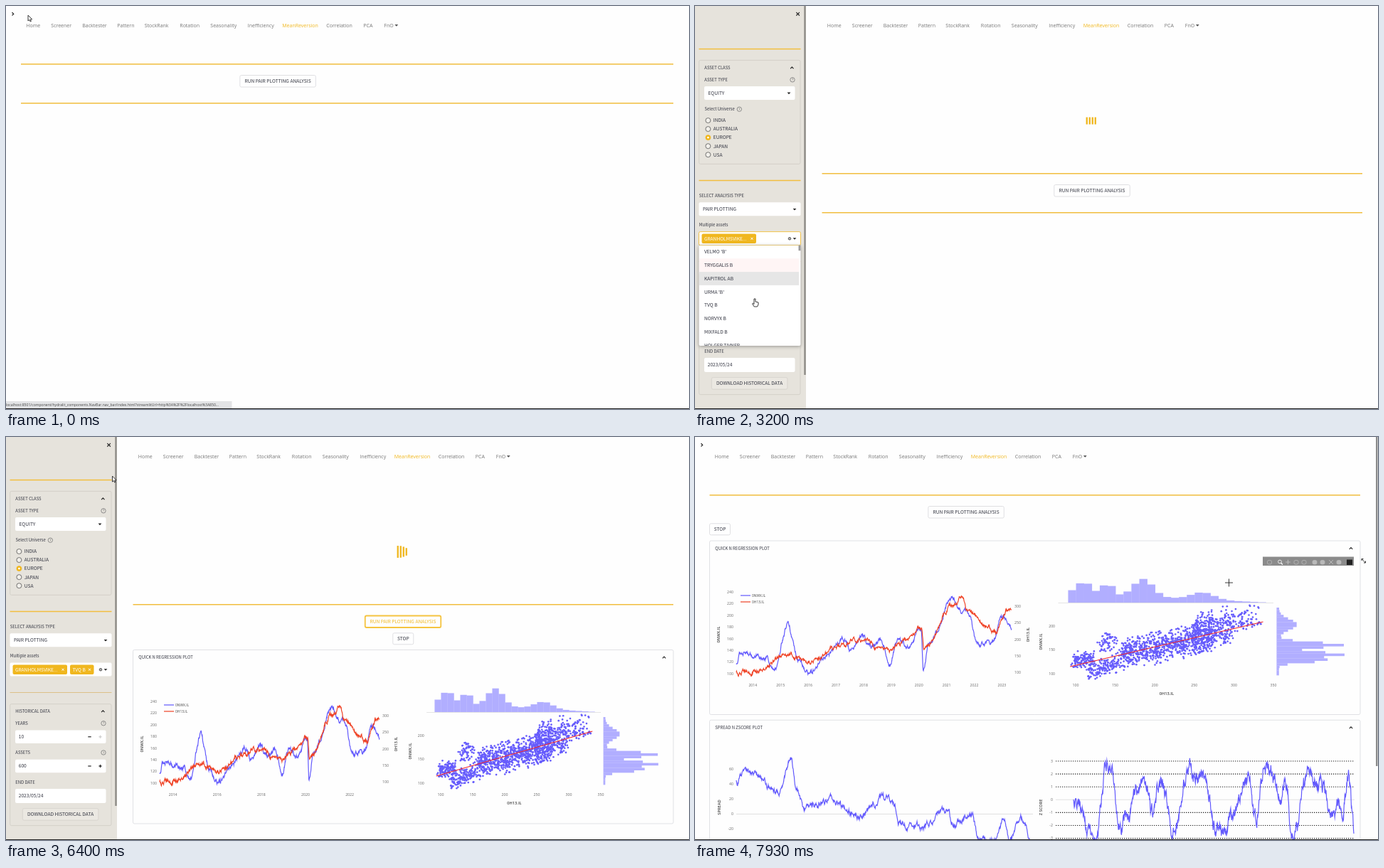
These frames come from a looping animation (960 by 567 pixels, 8 s). An HTML page with a canvas:

```html
<!DOCTYPE html>
<html lang="en">
<head>
<meta charset="utf-8">
<title>Pair plotting dashboard</title>
<style>
html, body { margin: 0; width: 100%; height: 100%; overflow: hidden; background: #fefefe; }
canvas { display: block; }
</style>
</head>
<body>
<canvas id="stage" width="960" height="567"></canvas>
<script>
const c = document.getElementById('stage').getContext('2d');
const LOOP = 8000;
const UI = '"Noto Sans CJK JP", "Noto Sans CJK", "Noto Sans", sans-serif';
const NAV = '"Open Sans", sans-serif';
const GOLD = '#f0b71f', INK = '#31333f', BLUE = '#6259fd', RED = '#ef4225', PALE = '#b1aeff';

// ---------- helpers ----------
const clamp = v => Math.max(0, Math.min(1, v));
const mix = (a, b, p) => a + (b - a) * p;
const ease = p => p * p * (3 - 2 * p);
const between = (t, a, b) => t >= a && t < b;
const randomizer = seed => () => (seed = (seed * 16807) % 2147483647) / 2147483647 - 0.5;

function text(s, x, y, size = 6.65, color = INK, align = 'left', font = UI, weight = 400) {
  c.font = `${weight} ${size}px ${font}`;
  c.textAlign = align;
  c.fillStyle = color;
  c.fillText(s, x, y + size * 0.36);
}
const label = (s, x, y) => text(s, x, y, 5.9);
const tick = (s, x, y, align = 'center') => text(s, x, y, 5.2, '#666', align, NAV);

function axisTitle(s, x, y) {
  c.save();
  c.translate(x, y);
  c.rotate(-Math.PI / 2);
  text(s, 0, 0, 5.7, '#444', 'center', NAV, 600);
  c.restore();
}
function rect(x, y, w, h, color) {
  c.fillStyle = color;
  c.fillRect(x, y, w, h);
}
function box(x, y, w, h, fill, stroke, lineWidth = 0.8) {
  c.beginPath();
  c.roundRect(x, y, w, h, 2);
  if (fill) { c.fillStyle = fill; c.fill(); }
  if (stroke) { c.strokeStyle = stroke; c.lineWidth = lineWidth; c.stroke(); }
}
function poly(points, color, width = 1) {
  c.beginPath();
  points.forEach(([x, y]) => c.lineTo(x, y));
  c.strokeStyle = color;
  c.lineWidth = width;
  c.stroke();
}
function dot(x, y, r, fill, stroke) {
  c.beginPath();
  c.arc(x, y, r, 0, 7);
  if (fill) { c.fillStyle = fill; c.fill(); }
  if (stroke) { c.strokeStyle = stroke; c.lineWidth = 0.8; c.stroke(); }
}
const rule = (x, y, x2, color = '#f1be3f', w = 1.5) => poly([[x, y], [x2, y]], color, w);
function cross(x, y, r, color, w = 1) {
  poly([[x - r, y - r], [x + r, y + r]], color, w);
  poly([[x - r, y + r], [x + r, y - r]], color, w);
}
function plus(x, y, r, color, w = 1.1) {
  rule(x - r, y, x + r, color, w);
  poly([[x, y - r], [x, y + r]], color, w);
}
const chevronUp = (x, y) => poly([[x - 2.2, y + 1.2], [x, y - 1.1], [x + 2.2, y + 1.2]], '#222', 1.1);
function caret(x, y, color = '#222') {
  c.beginPath();
  c.moveTo(x - 2.4, y - 1.2); c.lineTo(x + 2.4, y - 1.2); c.lineTo(x, y + 1.4);
  c.fillStyle = color;
  c.fill();
}
function help(x, y) {
  dot(x, y, 3.2, null, '#777');
  text('?', x, y, 4.6, '#555', 'center');
}
function button(s, x, y, w, h = 17, active = false, alpha = 1) {
  box(x, y, w, h, '#fefefe', active ? '#f5c440' : '#d8d8dc', active ? 1.8 : 0.8);
  c.globalAlpha = alpha;
  text(s, x + w / 2, y + h / 2, 6.65, active ? GOLD : INK, 'center');
  c.globalAlpha = 1;
}

// ---------- chart data ----------
// A noisy walk through a few turning points; x of the result runs from 0 to 1.
function walk(turns, noise, seed, count = 900) {
  const rand = randomizer(seed);
  const start = turns[0][0], span = turns[turns.length - 1][0] - start;
  let drift = 0, i = 0;
  return Array.from({ length: count }, (_, n) => {
    const p = n / (count - 1), x = start + p * span;
    while (i < turns.length - 2 && turns[i + 1][0] < x) i++;
    const [ax, ay] = turns[i], [bx, by] = turns[i + 1];
    drift = drift * 0.88 + rand() * noise;
    return [p, mix(ay, by, ease(clamp((x - ax) / (bx - ax)))) + drift];
  });
}
const bluePrice = walk([[58, 322], [64, 303], [100, 309], [111, 329], [130, 266], [145, 312], [160, 332], [184, 310],
  [208, 284], [221, 302], [235, 277], [246, 297], [262, 287], [273, 319], [286, 284], [300, 294], [318, 269],
  [321, 327], [328, 295], [362, 223], [370, 242], [384, 243], [397, 295], [418, 288], [432, 254], [445, 268]], 4.5, 71);
const redPrice = walk([[58, 333], [85, 331], [132, 307], [158, 319], [205, 293], [232, 284], [258, 295], [275, 301],
  [318, 268], [322, 298], [362, 235], [376, 223], [382, 245], [422, 274], [440, 242], [445, 243]], 4, 913);
const spread = walk([[58, 486], [70, 468], [92, 481], [118, 499], [135, 457], [141, 487], [154, 523], [190, 511],
  [232, 533], [264, 508], [280, 518], [286, 545], [320, 546], [355, 522], [362, 545], [390, 533], [398, 570],
  [424, 570], [434, 540], [442, 566], [458, 535], [474, 568]], 6, 37);
const zScore = walk([[533, 518], [564, 562], [580, 462], [603, 544], [634, 488], [645, 544], [656, 478], [672, 548],
  [697, 472], [713, 476], [738, 560], [756, 538], [776, 476], [788, 542], [802, 476], [816, 480], [824, 515],
  [830, 474], [841, 562], [862, 478], [884, 492], [898, 532], [905, 506], [911, 535], [919, 465], [927, 552]], 16, 5);

// Each cloud is a fuzzy segment: x1, y1, x2, y2, thickness, points.
const scatterRand = randomizer(402);
const scatter = [[487, 313, 514, 313, 13, 120], [506, 331, 545, 318, 15, 150], [520, 296, 543, 284, 18, 60],
  [548, 307, 665, 280, 24, 800], [640, 278, 690, 264, 30, 330], [690, 252, 722, 244, 16, 40], [690, 267, 728, 260, 9, 40]
].flatMap(([x1, y1, x2, y2, thick, count]) => Array.from({ length: count }, () => {
  const p = scatterRand() + 0.5;
  return [mix(x1, x2, p) + scatterRand() * 6, mix(y1, y2, p) + (scatterRand() + scatterRand()) * thick];
}));

const bumps = (i, list) => list.reduce((sum, [mid, height, w]) => sum + height * Math.exp(-(((i - mid) / w) ** 2)), 0);
const topBin = i => 13 * (1 - i / 25) + bumps(i, [[1.5, 17, 1.3], [4.5, 19, 0.8], [9, 25, 1.7], [16.5, 10, 2]]);
const sideBin = i => 3 + bumps(i, [[6.5, 23, 3], [15, 82, 1.6], [18.8, 82, 1.3], [21.3, 60, 1.3]]);

function drawSeries(data, x, w, color) {
  poly(data.map(([p, y]) => [x + p * w, y]), color, 1.2);
}

function regressionPlot({ x, w, sx, k }, dy) {
  c.save();
  c.translate(0, dy);
  const priceY = v => 333 - (v - 100) * 0.821;
  const scatterY = v => 333 - (v - 100) * 0.67;
  for (let v = 100; v <= 240; v += 20) tick(v, x - 4, priceY(v), 'right');
  for (let v = 100; v <= 300; v += 50) tick(v, x + w + 4, 331.5 - (v - 100) * 0.4675, 'left');
  for (let year = 2014; year <= 2023; year += w > 350 ? 1 : 2) tick(year, x + (year - 2013.4) * w / 9.95, 349);
  axisTitle('0NWX.IL', x - 25, 278);
  axisTitle('0H13.IL', x + w + 23, 278);
  drawSeries(bluePrice, x, w, BLUE);
  drawSeries(redPrice, x, w, RED);
  [['0NWX.IL', BLUE], ['0H13.IL', RED]].forEach(([name, color], i) => {
    rule(x + 6, 223 + i * 9, x + 20, color, 1.2);
    text(name, x + 22, 223 + i * 9, 4.9, '#444', 'left', NAV);
  });

  const sideX = sx + 254 * k;
  rule(sx - 22 * k, 233.5, sx + 250 * k, '#ddd', 0.8);
  for (let i = 0; i < 25; i++) rect(sx + (i * 10 - 9.5) * k, 233 - topBin(i), 10 * k + 0.3, topBin(i), PALE);
  for (let i = 0; i < 28; i++) rect(sideX, 240 + i * 3.4, sideBin(i) * k, 3.6, PALE);
  scatter.forEach(([px, py]) => dot(sx + (px - 491) * k, py, 1.35, '#675dfc'));
  poly([[sx - 7 * k, 323], [sx + 237 * k, 260]], '#f0262b', 1.2);
  for (let v = 100; v <= 200; v += 50) tick(v, sx - 26 * k, scatterY(v), 'right');
  for (let v = 100; v <= 350; v += 50) tick(v, sx + (v - 100) * k, 349);
  axisTitle('0NWX.IL', sx - 20 - 26 * k, 288);
  text('0H13.IL', sx + 115 * k, 361, 5.7, '#444', 'center', NAV, 600);
  c.restore();
}

function spreadPlots(wide) {
  const w = wide ? 416 : 373, shift = wide ? -1 : 0;
  rule(58, 530.5, 59 + w, '#ddd', 0.9);
  for (let v = 60; v >= -20; v -= 20) tick(v, 54, 530.5 - v * 1.05, 'right');
  axisTitle('SPREAD', 34, 521);
  drawSeries(spread, 58, w, BLUE);
  for (let v = 3; v >= -3; v--) {
    const y = 510.3 - v * 18.1;
    tick(v, 504 + shift, y, 'right');
    c.setLineDash(v ? [1.3, 1.7] : []);
    rule(508 + shift, y, 928 + shift, v ? '#222' : '#ddd', v ? 1.1 : 0.8);
  }
  c.setLineDash([]);
  axisTitle('Z SCORE', 486, 521);
  drawSeries(zScore, 533 + shift, 394, BLUE);
}

// ---------- page ----------
const navItems = { Home: 0, Screener: 35, Backtester: 79, Pattern: 128, StockRank: 166.5, Rotation: 216,
  Seasonality: 259, Inefficiency: 311.5, MeanReversion: 360, Correlation: 422, PCA: 474, FnO: 503 };

function nav(x) {
  for (const [s, dx] of Object.entries(navItems))
    text(s, x + dx, 27.5, 7, s === 'MeanReversion' ? GOLD : '#777', 'left', NAV);
  caret(x + 520.5, 27.3, '#555');
}

function loader(t) {
  for (let i = 0; i < 4; i++) {
    const swing = t < 4000 ? 0 : Math.sin((t - 6300) / 1000 * 2 * Math.PI - i * 0.55 + 1.1);
    const h = 10 + 7 * Math.max(0, swing);
    rect(549.6 + i * 4, 161.5 - h / 2, 2.3, h, GOLD);
  }
}

function modebar() {
  const faint = '#b9b9b9';
  rect(798, 168.5, 128, 12.5, '#8b8b8b');
  dot(822, 175.5, 2.4, null, '#fff');
  poly([[823.6, 177.2], [826, 179.5]], '#fff', 1.3);
  plus(833.5, 176, 3.3, faint);
  for (const x of [807.5, 845, 856, 871, 882, 905]) box(x - 3, 173.5, 6, 5.5, x > 860 && faint, faint);
  cross(894, 176, 3, faint);
  rect(916, 172.5, 8, 7.5, '#222');
  poly([[937, 174], [937, 171.5], [939.5, 171.5]], '#333');
  poly([[937, 171.5], [942.5, 177]], '#333');
  poly([[942.5, 174.5], [942.5, 177], [940, 177]], '#333');
}

function expander(title, x, y, right, h) {
  box(x, y, right - x, h, null, '#d9dadf');
  label(title, x + 7.8, y + 10.7);
  chevronUp(right - 13, y + 10.7);
}

function page(t, open) {
  const running = between(t, 3170, 3950) || between(t, 5700, 6950);
  const results = t >= 5800, done = t >= 6950, wide = t >= 7530;
  const left = done ? (wide ? 20.5 : 22) : 21 + 157.5 * open;
  const right = done ? 935 : 938;
  const dy = running ? 154 : 0;
  const stale = between(t, 3000, 3170) || between(t, 5640, 5700);

  nav(left + 7.3);
  rule(left, 81.7 + dy, right);
  const bx = running ? (left + right) / 2 - 53.5 : done ? left + 307.3 : 328.8 + 105.4 * open;
  button('RUN PAIR PLOTTING ANALYSIS', bx, 97.5 + dy, 106.5, 16.5, between(t, 5430, 6950), stale ? 0.4 : 1);
  if (running) loader(t);
  if (!results) {
    rule(left, 136.7 + dy, right);
    return;
  }
  button('STOP', running ? bx + 39 : left, 121.8 + dy, 29, 16);
  if (t < 5900) return;
  expander('QUICK N REGRESSION PLOT', left, done ? 146 : 299.5, right, 244.5);
  if (!done) {
    if (t >= 6130) regressionPlot({ x: left + 37.5, w: 309, sx: left + 432.5, k: 0.9 }, 154);
    return;
  }
  regressionPlot(wide ? { x: 58, w: 387, sx: 535, k: 1.112 } : { x: 58, w: 321, sx: 491, k: 1 }, 0);
  expander('SPREAD N ZSCORE PLOT', left, 398.3, right, 200);
  if (t >= 7130) spreadPlots(wide);
  rect(957, 0, 2.5, 463, '#8c8c8c');
  if (t >= 7660) modebar();
}

// ---------- sidebar ----------
function numberField(name, value, y, plusColor) {
  label(name, 13.3, y);
  help(137, y);
  box(13, y + 9.7, 127.5, 18.6, '#fff');
  text(value, 17.7, y + 19);
  rule(115.3, y + 19, 119.7, '#222', 1.2);
  plus(132.5, y + 19, 2.1, plusColor, 1.2);
}
function select(value, x, y, w, focus, color) {
  box(x, y, w, 19, '#fff', focus && GOLD);
  text(value, x + 5.4, y + 9.7, 6.65, color);
  caret(x + w - 8.5, y + 9.8);
}
function tag(s, x, w) {
  box(x, 320.5, w, 13.5, GOLD);
  text(s, x + 3.4, 327.3, 6.6, '#fff');
  cross(x + w - 6, 327.3, 1.5, '#fff');
}
function panel(y, h) {
  c.save();
  c.shadowColor = 'rgba(0,0,0,.35)';
  c.shadowBlur = 5;
  c.shadowOffsetY = 1;
  box(5.5, y, 143, h, '#fff');
  c.restore();
}
function list(items, y, h, rowTints) {
  panel(y, h);
  c.save();
  c.beginPath();
  c.rect(5.5, y, 143, h);
  c.clip();
  items.forEach((s, i) => {
    const mid = y + 9.3 + i * 18.75;
    if (rowTints[i]) rect(6, mid - 9.4, 140, 18.75, rowTints[i]);
    text(s, 13, mid);
  });
  c.restore();
}
const analyses = ['PAIR PLOTTING', 'PAIR SCREENER', 'COINTEGRATION', 'HALF LIFE', 'STATIONARITY', 'SPREAD ANALYSIS', 'ZSCORE ANALYSIS'];
const firstPick = 'GRANHOLMSVIKE...';
const assets = ["VELMO 'B'", 'TRYGGALIS B', 'KAPITROL AB', "URMA 'B'", 'TVQ B', 'NORVYX B', 'MIXFALD B', 'HOLGER TIVNER'];

function dropdowns(t, picks) {
  if (between(t, 1530, 2260)) list(analyses, 296, 132, ['#e6e6e6']);
  if (between(t, 2560, 3480)) {
    if (picks) list(assets, 336.7, 141.3, ['', '#fff5f5', '#e6e6e6']);
    else list([firstPick, ...assets], 336.7, 141.3, ['#e6e6e6']);
    rect(145.5, 336.7, 3, 7.5, '#999');
  }
  if (between(t, 3480, 4960)) {
    panel(336.7, 42);
    text('You can only select up to 2 options.', 75.5, 357.6, 6.6, '#a9abb5', 'center');
    text('Remove an option first.', 75.5, 369.8, 6.6, '#a9abb5', 'center');
  }
}

function sidebar(t, open) {
  if (open <= 0) return;
  const picks = t < 2960 ? 0 : t < 3480 ? 1 : 2;
  const shifted = between(t, 3170, 3950) || t >= 5700;
  c.save();
  c.translate(-156 * (1 - open), 0);
  rect(0, 0, 156, 567, '#e6e3dc');
  cross(144.6, 11.2, 2.3, '#222', 1.1);
  rule(5.5, 60.5, 148.5);

  box(5.7, 76.3, 142.3, 146, null, '#cfccc4');
  label('ASSET CLASS', 13.3, 87);
  chevronUp(136.3, 87);
  label('ASSET TYPE', 13.3, 103.6);
  help(137, 103.8);
  select('EQUITY', 13, 113, 127.5);
  label('Select Universe', 13.5, 145.2);
  help(62.3, 145.2);
  ['INDIA', 'AUSTRALIA', 'EUROPE', 'JAPAN', 'USA'].forEach((s, i) => {
    const y = 161 + i * 12.05, on = s === 'EUROPE';
    dot(18.4, y, 3.5, on ? GOLD : '#f2f0eb', on ? GOLD : '#555');
    if (on) dot(18.4, y, 1.4, '#fff');
    text(s, 25.8, y);
  });

  rule(5.5, 245.6, 148.5);
  label('SELECT ANALYSIS TYPE', 5.8, 267);
  select('PAIR PLOTTING', 5.5, 276.3, 143, between(t, 1530, 2500));
  label('Multiple assets', 5.8, 308.3);
  rule(5.5, 359.5, 148.5, '#dcc088', 1);

  box(5.7, 375.7, 142.3, 171, null, '#cfccc4');
  label('HISTORICAL DATA', 13.3, 386);
  chevronUp(136.3, 386);
  numberField('YEARS', '10', 402.8, '#ccc');
  numberField('ASSETS', '600', 444, '#222');
  label('END DATE', 13.3, 485.5);
  box(13, 495, 127.5, 20, '#fff');
  text('2023/05/24', 17.7, 505);
  const bx = shifted ? 23.3 : 13.2;
  box(bx, 522.7, 106.6, 16.5, '#ebe8e2', '#d3d0c9');
  c.globalAlpha = between(t, 3000, 3170) ? 0.4 : 1;
  text('DOWNLOAD HISTORICAL DATA', bx + 53.3, 531, 6.65, INK, 'center');
  c.globalAlpha = 1;

  select(picks ? '' : 'Choose an option', 5.5, 317.6, 143, between(t, 2540, 4960), '#888');
  if (picks) {
    tag(firstPick, 9.5, 76.5);
    dot(133, 327.3, 2.2, '#666');
    cross(133, 327.3, 0.9, '#fff', 0.7);
  }
  if (picks > 1) tag('TVQ B', 90, 33.5);
  dropdowns(t, picks);
  rect(153.3, 0, 2.4, 519, '#8c8a86');
  c.restore();
}

// ---------- pointer: time, x, y and the shape from then on ----------
const path = [
  [70, 31, 13, 'arrow'], [250, 9, 9, 'hand'], [450, 10, 11, 'arrow'], [800, 97, 152, 'arrow'],
  [930, 98, 153, 'arrow'], [1270, 74, 280, 'hand'], [1470, 74, 280, 'hand'], [1850, 66, 345, 'hand'],
  [2230, 60, 303, 'hand'], [2800, 55, 344, 'hand'], [3200, 84, 412, 'hand'], [3500, 80, 418, 'arrow'],
  [4000, 150, 282, 'beam'], [4220, 150, 282, 'beam'], [4670, 133, 308, 'hand'], [4880, 133, 308, 'arrow'],
  [5480, 487, 105, 'hand'], [5800, 487, 105, 'arrow'], [6400, 149.5, 55, 'arrow'], [6600, 144, 10, 'arrow'],
  [6900, 146, 12, 'arrow'], [7400, 490.5, 279, 'arrow'], [7490, 492, 278, 'cross'], [7900, 750.5, 205, 'cross']
];
const shapes = {
  arrow: new Path2D('M0 0V8L1.9 6.4L3.2 9L4.4 8.4L3.3 5.9L5.6 5.7Z'),
  hand: new Path2D('M-1 0H1V4L5 5V8L3.6 11H-.8L-3.4 7L-2.6 6L-1 7.5Z'),
  beam: new Path2D('M0-4V4M-1.6-4H1.6M-1.6 4H1.6'),
  cross: new Path2D('M-5.5 0H5.5M0-5.5V5.5')
};

function pointer(t) {
  const next = path.find(key => key[0] > t) || path[path.length - 1];
  const last = path.findLast(key => key[0] <= t) || path[0];
  const p = ease(clamp((t - last[0]) / (next[0] - last[0] || 1)));
  const shape = shapes[last[3]];
  c.save();
  c.translate(mix(last[1], next[1], p), mix(last[2], next[2], p));
  c.fillStyle = '#fff';
  c.fill(shape);
  c.strokeStyle = '#222';
  c.lineWidth = 0.9;
  c.stroke(shape);
  c.restore();
}

function draw(t) {
  const open = ease(clamp((t - 280) / 270)) - ease(clamp((t - 6650) / 270));
  rect(0, 0, 960, 567, '#fefefe');
  page(t, open);
  if (open < 0.5) poly([[8.5, 9], [10.7, 11.2], [8.5, 13.4]], '#222', 1.2);
  sidebar(t, open);
  if (t < 140) {
    rect(0, 556, 317.5, 10, '#e3e4e6');
    text('localhost:8501/component/hydralit_components.NavBar.nav_bar/index.html?streamlitUrl=http%3A%2F%2Flocalhost%3A850...',
      0, 561.5, 5.1, '#444', 'left', NAV);
  }
  rect(0, 566, 960, 1, '#222');
  pointer(t);
}

const start = performance.now();
function frame() {
  draw((performance.now() - start) % LOOP);
  requestAnimationFrame(frame);
}
frame();
</script>
</body>
</html>
```
